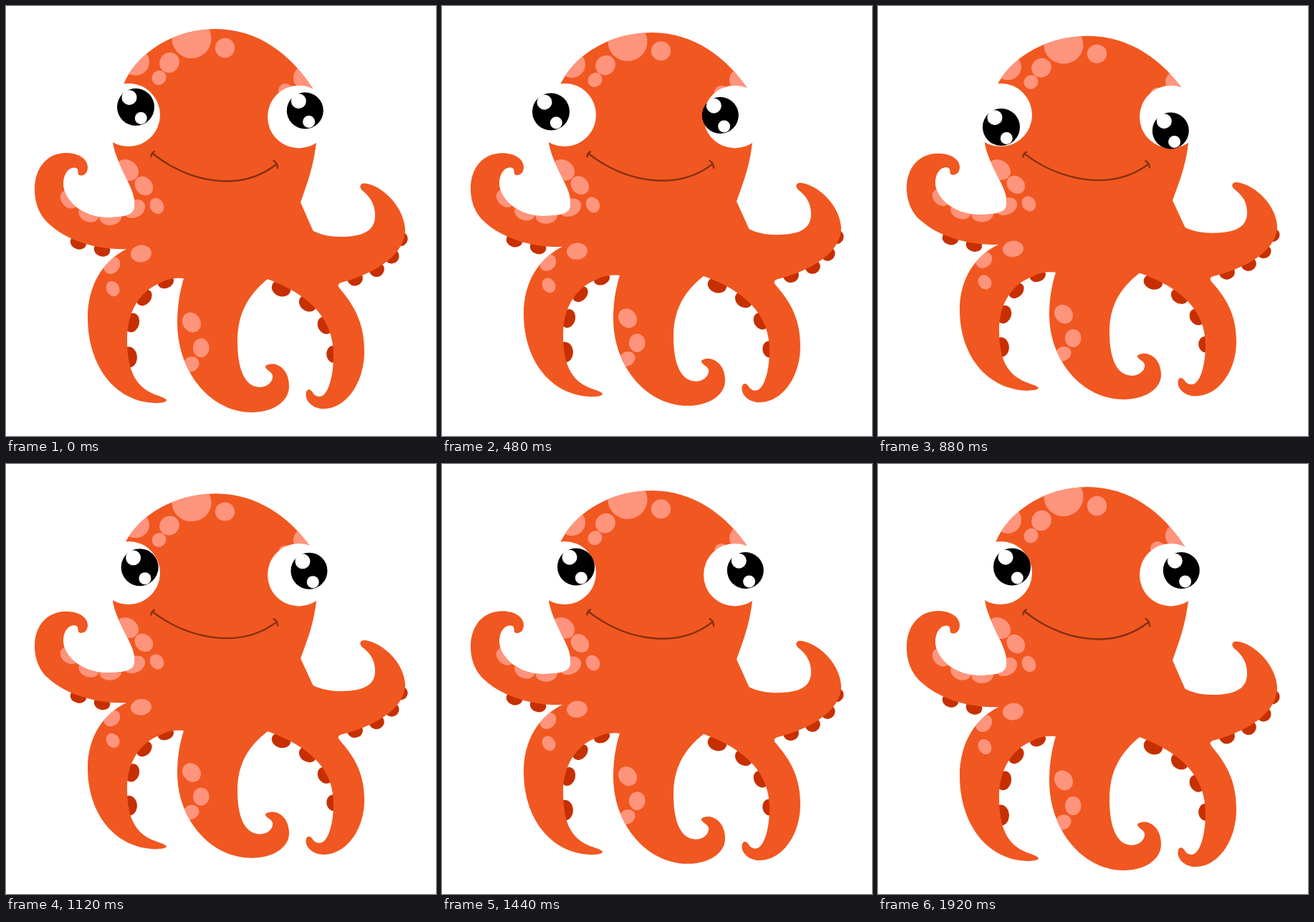
Recreate the animation shown at these times as an HTML page. Size 600x600 px, loop 2 s.

```html
<!DOCTYPE html>
<html lang="en">
<head>
<meta charset="utf-8">
<title>Octopus</title>
<style>
  html, body { margin: 0; width: 100%; height: 100%; overflow: hidden; background: #fff; }
  svg { display: block; width: 100%; height: 100%; }
</style>
</head>
<body>
<svg id="stage" viewBox="0 0 600 600"></svg>
<script>
const ORANGE = '#f15720', PINK = '#ff947c', DARK = '#c63000', LINE = '#842f12';
const LOOP = 2000, STEP = 80, BREATH = 1920, TURN = 180;
const PIVOT_Y = 219, SQUASH = 0.0525;

const torso = `M149,190 L163,112 C180,68 230,33 292,32 C352,32 398,68 428,115 L433,190
  C429,225 421,245 411,274 L440,340 L365,381 L300,410 L248,380 L168,340 L150,295
  C163,295 177,293 179,283 C182,265 171,248 163,230 C156,215 151,203 149,190 Z`;

const leftArm = `M190,340 L168,339 C130,341 85,328 60,304 C45,291 40,272 40,256
  C40,225 58,205 84,205 C102,205 114,214 114,225 C114,233 109,237 104,236.5
  C98,236 103,229 98,226 C90,223 80,232 80,248 C80,272 108,295 140,295
  C160,295 177,293 179,283 L215,300 Z`;

const rightArm = `M390,274 L411,274 C402,302 428,322 466,322 C500,322 515,313 515,292
  C515,274 505,264 499,259 C492,254 493,247 501,247.5 C523,250 555,278 557,312
  C557,345 520,372 467,386 L390,375 Z`;

const leftLeg = `M200,330 L168,339 C135,356 114,390 114,435 C114,500 150,552 208,554
  C216,554 224,553 224,550 C222,546 211,544 203,540 C180,529 169,507 169,465
  C169,425 188,397 216,386 C226,380 237,379 248,380 L260,340 Z`;

const middleLeg = `M260,360 L248,380 C242,400 239,420 239,442 C239,510 285,567 343,567
  C372,567 395,552 395,531 C395,514 387,502 374,499.5 C368,499 361,501 362,504
  C365,510 371,510 372,516 C373,523 366,532 354,532 C328,531 323,495 323,468
  C323,430 337,404 365,381 L365,350 Z`;

const rightLeg = `M365,350 L365,381 C424,403 457,437 457,487 C457,515 450,544 438,545
  C433,545 430,543 427,538 C424,534 419,534 418.5,542 C418,551 428,562 443,562
  C475,562 500,525 500,482 C500,445 488,421 468,397 C464,392 461,389 467,386
  L450,340 Z`;

const mix = (a, b, p) => a + (b - a) * p;
const path = (d, fill) => `<path d="${d}" fill="${fill}"/>`;
const ellipse = (x, y, rx, ry, fill, tilt = 0) =>
  `<ellipse rx="${rx}" ry="${ry}" fill="${fill}" transform="translate(${x} ${y}) rotate(${tilt})"/>`;
const circle = (x, y, r, fill) => ellipse(x, y, r, r, fill);

// Evenly spaced ovals along a quadratic curve, each turned along it.
function row(count, [ax, ay], [bx, by], [cx, cy], fill, first, last = first, flat = 0.82) {
  return Array.from({ length: count }, (_, i) => {
    const p = i / (count - 1), r = mix(first, last, p);
    const x0 = mix(ax, bx, p), y0 = mix(ay, by, p);
    const x1 = mix(bx, cx, p), y1 = mix(by, cy, p);
    const tilt = Math.atan2(y1 - y0, x1 - x0) * 180 / Math.PI;
    return ellipse(mix(x0, x1, p), mix(y0, y1, p), r, r * flat, fill, tilt);
  }).join('');
}

const suckers =
  row(2, [101, 330], [118, 335], [134, 340], DARK, 11.5) +
  row(4, [223, 385], [168, 408], [172, 490], DARK, 11.5, 14.5, 0.75) +
  row(4, [384, 394], [449, 418], [457, 486], DARK, 13.5, 12) +
  row(4, [487, 380], [539, 366], [551, 325], DARK, 11, 10, 0.95);

const spots =
  circle(181, 78, 19, PINK) + circle(259, 45.5, 27.5, PINK) + circle(305.5, 58.5, 13.7, PINK) +
  circle(418, 100, 17, PINK) + circle(390, 118, 10, PINK) +
  row(2, [228, 79], [220, 90], [213.5, 100], PINK, 14.5, 10.5, 0.93) +
  row(3, [169, 229], [195, 248], [210.5, 279], PINK, 17, 11.5) +
  row(4, [88, 270], [127, 312], [179, 283], PINK, 14, 16, 0.75) +
  row(3, [188.5, 345.5], [127, 354], [149, 394.5], PINK, 14.5, 11) +
  row(3, [259, 441.5], [286, 483], [258, 500], PINK, 14.5, 12, 0.85);

const pupil = (r, glintX) => circle(0, 0, r, '#000') +
  circle(-9, -13.3, 10.5, '#fff') + circle(glintX, 15.5, 8.5, '#fff');

const skin = [torso, leftArm, rightArm, leftLeg, middleLeg, rightLeg]
  .map(d => path(d, ORANGE)).join('');

document.getElementById('stage').innerHTML = `
  <defs><clipPath id="skin">${skin}</clipPath></defs>
  <g id="body">
    ${suckers}${skin}
    <g clip-path="url(#skin)">${spots}</g>
    <path d="M205,206 C252,244 325,262 377,221 M202.5,210 Q203,205 207,203 M373.5,216 Q379,219 379,226"
      fill="none" stroke="${LINE}" stroke-width="2.4" stroke-linecap="round"/>
  </g>
  ${circle(171, 152, 44, '#fff')}${circle(408.7, 154.7, 43.7, '#fff')}
  <g id="leftPupil">${pupil(26, 7.3)}</g>
  <g id="rightPupil">${pupil(25.5, 5.3)}</g>`;

const [body, leftPupil, rightPupil] =
  ['body', 'leftPupil', 'rightPupil'].map(id => document.getElementById(id));

// Where the left pupil looks, and when it starts turning there.
const gaze = [
  { at: -TURN, x: 181, y: 141 },
  { at: 80, x: 152, y: 147.5 },
  { at: 680, x: 172, y: 169 },
  { at: 960, x: 187, y: 143.5 }
];

const ease = p => p < 0.5 ? 2 * p * p : 1 - 2 * (1 - p) ** 2;

function lookAt(t) {
  let { x, y } = gaze[0];
  for (const look of gaze) {
    const p = ease(Math.min(1, Math.max(0, (t - look.at) / TURN)));
    x = mix(x, look.x, p);
    y = mix(y, look.y, p);
  }
  return [x, y];
}

function draw(time) {
  const t = Math.floor((time % LOOP) / STEP) * STEP;
  const half = BREATH / 2;
  const scale = 1 - SQUASH * ease(1 - Math.abs(t - half) / half);
  body.setAttribute('transform', `translate(0 ${PIVOT_Y * (1 - scale)}) scale(1 ${scale})`);
  const [x, y] = lookAt(t);
  leftPupil.setAttribute('transform', `translate(${x} ${y})`);
  rightPupil.setAttribute('transform', `translate(${x + 236.3} ${y + 5})`);
}

const start = performance.now();
function tick() {
  draw(performance.now() - start);
  requestAnimationFrame(tick);
}
tick();
</script>
</body>
</html>
```
